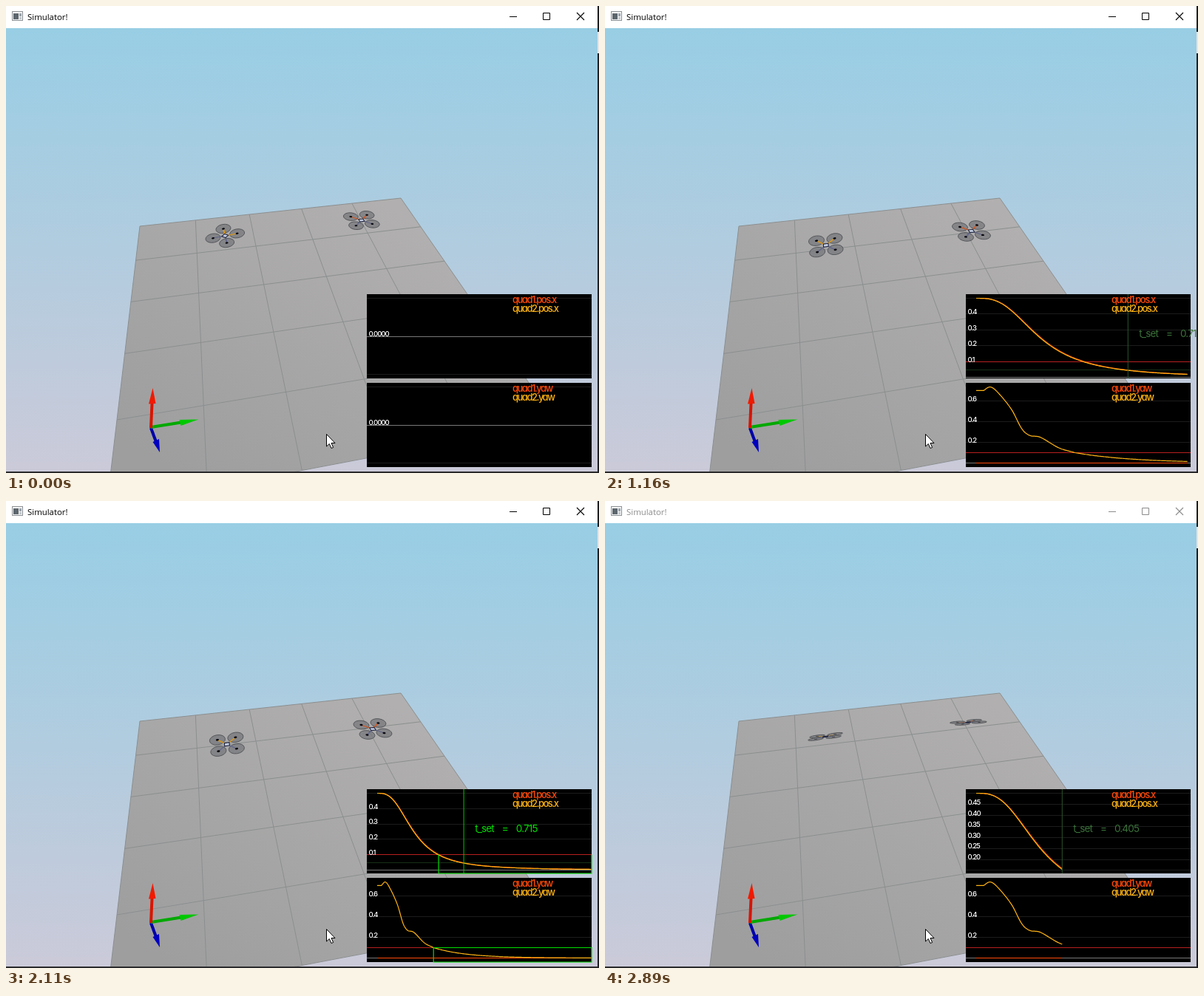
Write an HTML page that moves like this. It is 802 by 632 pixels and loops after 2960 ms.

```html
<!DOCTYPE html>
<html lang="en">
<head>
<meta charset="utf-8">
<title>Simulator</title>
<style>
  html, body { margin: 0; width: 100%; height: 100%; overflow: hidden; background: #fff; }
  svg { display: block; width: 802px; height: 632px; }
  .title { font: 11.4px "Open Sans", "Noto Sans", sans-serif; }
  .plot { font-family: Inter, Lato, sans-serif; font-feature-settings: "cv11"; }
  .legend { font-size: 13px; font-weight: 500; letter-spacing: -1.5px; }
  .tick { font-size: 9.6px; font-weight: 500; letter-spacing: -1.05px; fill: #fff; }
  .settle { font-size: 13.5px; letter-spacing: -.85px; word-spacing: 8px; }
  .chrome { --ink: #000; }
  .chrome.idle { --ink: #8c8c8c; }
  .chrome text { fill: var(--ink); }
  .chrome path { stroke: var(--ink); fill: none; }
  .rotor { fill: #74767a; fill-opacity: .72; stroke: #55575a; vector-effect: non-scaling-stroke; }
  .hub { fill: #05050c; }
  .arm { fill: none; stroke-width: .15; }
  .hull { fill: #c3cde2; stroke: #20243c; stroke-width: 1.1; vector-effect: non-scaling-stroke; }
  .crisp { shape-rendering: crispEdges; }
</style>
</head>
<body>
<svg viewBox="0 0 802 632">
  <defs>
    <linearGradient id="sky" x1="0" y1="0" x2="0" y2="1">
      <stop offset="0" stop-color="#98cee5"/>
      <stop offset="1" stop-color="#cbcad9"/>
    </linearGradient>
    <linearGradient id="floor" gradientUnits="userSpaceOnUse" x1="500" y1="260" x2="240" y2="640">
      <stop offset="0" stop-color="#b1afaf"/>
      <stop offset="1" stop-color="#9e9e9f"/>
    </linearGradient>
    <clipPath id="clip0"><rect x="488" y="390" width="304" height="114"/></clipPath>
    <clipPath id="clip1"><rect x="488" y="510" width="304" height="114"/></clipPath>
  </defs>

  <rect y="30" width="802" height="602" fill="url(#sky)"/>
  <path id="ground" fill="url(#floor)"/>
  <path id="grid" fill="none" stroke="#8b8f8f"/>

  <g id="axes">
    <path d="M196 571L203 590" stroke="#0000a8" stroke-width="4"/>
    <path d="M198.500 590L207 586L208 604Z" fill="#0000c0"/>
    <path d="M196 570L237 563.500" stroke="#00a800" stroke-width="4"/>
    <path d="M234.500 560L236.500 568L260.500 559.500Z" fill="#00c800"/>
    <path d="M196 571L197.500 538" stroke="#d81400" stroke-width="4"/>
    <path d="M193 538.500L202.500 538L198.500 517Z" fill="#f01a00"/>
  </g>

  <g id="drones"></g>

  <g class="plot">
    <rect class="crisp" x="488" y="390" width="304" height="114"/>
    <rect class="crisp" x="488" y="510" width="304" height="114"/>
    <g id="plots"></g>
    <g class="legend">
      <text x="685" y="402" fill="#ff4a08">quad1.pos.x</text>
      <text x="685" y="414" fill="#ffb414">quad2.pos.x</text>
      <text x="685" y="522" fill="#ff4a08">quad1.yaw</text>
      <text x="685" y="534" fill="#ffb414">quad2.yaw</text>
    </g>
  </g>

  <path d="M433.500 579.500V596L437.300 592.500L440 598.500L442.600 597.400L440 591.500H445Z" fill="#fff" stroke="#000"/>

  <g class="crisp">
    <rect y="630" width="802" height="2" fill="#2b2b2d"/>
    <rect x="800" width="2" height="632" fill="#1f1f22"/>
    <rect x="800" y="35" width="2" height="29" fill="#e4e4e4"/>
    <rect width="800" height="30" fill="#fff"/>
    <rect x="8.500" y="7.500" width="14" height="12" fill="#f4f4f4" stroke="#8d9296"/>
    <rect x="10" y="10" width="7" height="8" fill="#5d666d"/>
    <rect x="18" y="10" width="3" height="4" fill="#9aa4ac"/>
    <rect x="18" y="15" width="3" height="3" fill="#c3c9ce"/>
  </g>
  <g class="chrome" id="chrome">
    <text class="title" x="29" y="18.500">Simulator!</text>
    <path d="M681 14.500H691M726.500 9.500H735.500V18.500H726.500Z"/>
    <path d="M772 9L782 19M782 9L772 19" stroke-width="1.100"/>
  </g>
</svg>

<script>
const $ = id => document.getElementById(id);
const LOOP = 2960, LAST = 37, RESET = 31;
const SETTLED = .715;

// The screen refreshes in bursts of seven steps
function frameAt(ms) {
  const since = ms - 62;
  if (since < 0) return 0;
  const burst = Math.floor(since / 548);
  const step = Math.min(6, Math.floor((since % 548) / 76));
  return Math.min(LAST, 1 + 7 * burst + step);
}

// Smooth curve through [time, value] points
function track(...pts) {
  const slope = i => {
    const a = pts[Math.max(i - 1, 0)], b = pts[Math.min(i + 1, pts.length - 1)];
    return (b[1] - a[1]) / (b[0] - a[0]);
  };
  return t => {
    if (t <= pts[0][0]) return pts[0][1];
    const i = pts.findIndex(p => p[0] >= t) - 1;
    if (i < 0) return pts[pts.length - 1][1];
    const [t0, v0] = pts[i], [t1, v1] = pts[i + 1];
    const h = t1 - t0, s = (t - t0) / h, r = 1 - s;
    return r * r * (1 + 2 * s) * v0 + s * s * (3 - 2 * s) * v1
      + h * s * r * (r * slope(i) - s * slope(i + 1));
  };
}

const simClock = track([0, 0], [6, .39], [11, .705], [18, 1.205], [27, 1.772], [30, 1.96]);
const simAt = n => Math.round(200 * (n < RESET ? simClock(n) : .035 + (n - RESET) * .0617)) / 200;

const posX = t => .5 / (1 + 26.6 * t ** 3.5 / (t + .1));
const posX1 = t => posX(t * .987);
const yawStart = track([.035, .7], [.066, .734], [.1, .685], [.167, .515], [.215, .33],
  [.25, .268], [.3, .25], [.39, .146], [.465, .1]);
const yaw = t => t < .465 ? yawStart(t) : .1 * Math.exp(3.6 * (.465 - t));
// Leans back to start moving, then forward to brake
const pitch = t => 10 * t * (t / .24 - 1) * Math.exp(-10.4 * t * t);
const climb = t => (t / .7 * Math.exp(1 - t / .7)) ** 2;

// Floor: 5 x 5 cells in perspective
function floorPoint(u, v) {
  const w = 1 + .01701 * u - .08975 * v;
  return [(181 + 79.68 * u - 21.21 * v) / w, (298 - 3.18 * u + 15.24 * v) / w];
}
const lineOf = pts => "M" + pts.map(p => p.map(n => n.toFixed(2))).join("L");
const corners = [[0, 0], [5, 0], [5, 5], [0, 5]].map(c => floorPoint(...c));
$("ground").setAttribute("d", lineOf(corners) + "Z");
let gridPath = "";
for (let i = 0; i <= 5; i++)
  gridPath += lineOf([floorPoint(i, 0), floorPoint(i, 5)]) + lineOf([floorPoint(0, i), floorPoint(5, i)]);
$("grid").setAttribute("d", gridPath);

// right / back: screen vectors of the level craft; up: its height axis
const CRAFT = [
  { color: "#e39a10", at: [296.3, 311], move: [2.6, 21], lift: 8.5,
    right: [12.25, -1.75], back: [.75, 7.7], up: 10, yaw },
  { color: "#d9531a", at: [480.8, 290], move: [15.3, 20.5], lift: 6,
    right: [11.5, -1.25], back: [4, 6.75], up: 9.3, yaw: () => 0 }
];
const BLADES = [[-1, -1], [1, -1], [1, 1], [-1, 1]];
const blades = (cls, r) => BLADES.map(([x, y]) => `<circle class="${cls}" cx="${x}" cy="${y}" r="${r}"/>`).join("");

function drone(c, t) {
  const gone = 1 - posX(t) / .5, size = .95 + .05 * gone, depth = .9 + .1 * gone;
  const p = pitch(t), cos = Math.cos(p) * depth, sin = Math.sin(p);
  const m = [
    c.right[0] * size, c.right[1] * size,
    c.back[0] * cos, c.back[1] * cos - c.up * sin,
    c.at[0] + c.move[0] * gone, c.at[1] + c.move[1] * gone - c.lift * climb(t)
  ];
  return `<g transform="matrix(${m.map(n => n.toFixed(3))}) rotate(${(c.yaw(t) * 180 / Math.PI).toFixed(2)})">
    ${blades("rotor", .86)}
    <path class="arm" stroke="#62668a" d="M-.9 .9L0 0L.9 .9"/>
    <path class="arm" stroke="${c.color}" d="M-.9 -.9L0 0L.9 -.9"/>
    ${blades("hub", .17)}
    <rect class="hull" x="-.27" y="-.27" width=".54" height=".54"/></g>`;
}

const stroke = (d, color, width = 1) => `<path d="${d}" fill="none" stroke="${color}" stroke-width="${width}"/>`;
const rule = (y, color) => `<path class="crisp" d="M488 ${Math.floor(y) + .5}H792" stroke="${color}"/>`;

// 1-2-5 tick spacing with at most seven ticks
function tickStep(span) {
  let step = .0005;
  for (let i = 0; span / step > 7.1; i++) step *= i % 3 === 2 ? 2.5 : 2;
  return step;
}

function chart(n, first, second, t, opt) {
  const top = 390 + 120 * n;
  const X = s => 502 + s * 290 / Math.max(1.01, t);
  const times = [];
  for (let s = 0; s < t; s += .005) times.push(s);
  if (t) times.push(t);
  const all = times.flatMap(s => [first(s), second(s)]);
  let lo = t ? Math.min(...all) : 0, hi = t ? Math.max(...all) : 0;
  if (hi - lo < .001) {
    const mid = (lo + hi) / 2;
    lo = mid - .0005;
    hi = mid + .0005;
  }
  const span = hi - lo;
  const Y = v => top + 5.5 + (hi - v) / span * 103;
  const inside = v => Y(v) > top && Y(v) < top + 114;

  const step = tickStep(span);
  const digits = Math.ceil(-Math.log10(step) - 1e-6);
  let lines = "", labels = "";
  for (let i = Math.floor(lo / step) - 1; i * step < hi + step; i++) {
    const v = i * step, y = Y(v);
    if (!inside(v)) continue;
    lines += rule(y, "#1c1c1c");
    if (y > top + 8 && y < top + 102)
      labels += `<text class="tick" x="490.500" y="${(y + .3).toFixed(1)}">${v.toFixed(digits)}</text>`;
  }
  if (inside(0)) lines += rule(Y(0), "#787878");
  if (opt.band && inside(opt.band)) lines += rule(Y(opt.band), "#173017");
  if (inside(.1)) lines += rule(Y(.1), "#b82020");

  const curve = f => lineOf(times.map(s => [X(s), Y(f(s))]));
  if (t) lines += stroke(curve(first), "#ff4a08", 1.2) + stroke(curve(second), "#ffb414", 1.2);

  let over = "";
  if (opt.band && t) {
    const set = Math.min(t, SETTLED), x = X(set), done = t >= 1.5;
    over += stroke(`M${x} ${top}V${top + 114}`, done ? "#00c800" : "#2c562c");
    over += `<text class="settle" x="${x + 15}" y="${top + 58}" fill="${done ? "#00e000" : "#3a723a"}">t_set = ${set.toFixed(3)}</text>`;
  }
  if (t - opt.enter >= opt.hold) {
    const x = X(opt.enter), y = Math.floor(Y(.1)) + .5, end = top + 114;
    over += stroke(`M${x} ${y}V${end}H792V${y}` + (opt.band ? "" : "Z"), "#00e000", 1.2);
  }
  return `<g clip-path="url(#clip${n})">${lines}</g>${labels}${over}`;
}

function draw(n) {
  const t = simAt(n);
  $("drones").innerHTML = CRAFT.map(c => drone(c, t)).join("");
  $("plots").innerHTML =
    chart(0, posX1, posX, t, { band: .05, enter: .507, hold: 1.25 }) +
    chart(1, () => 0, yaw, t, { enter: .465, hold: 1 });
  $("chrome").classList.toggle("idle", n === LAST);
}

const start = performance.now();
let shown = -1;
function tick() {
  const n = frameAt((performance.now() - start) % LOOP);
  if (n !== shown) draw(shown = n);
  requestAnimationFrame(tick);
}
tick();
</script>
</body>
</html>
```
